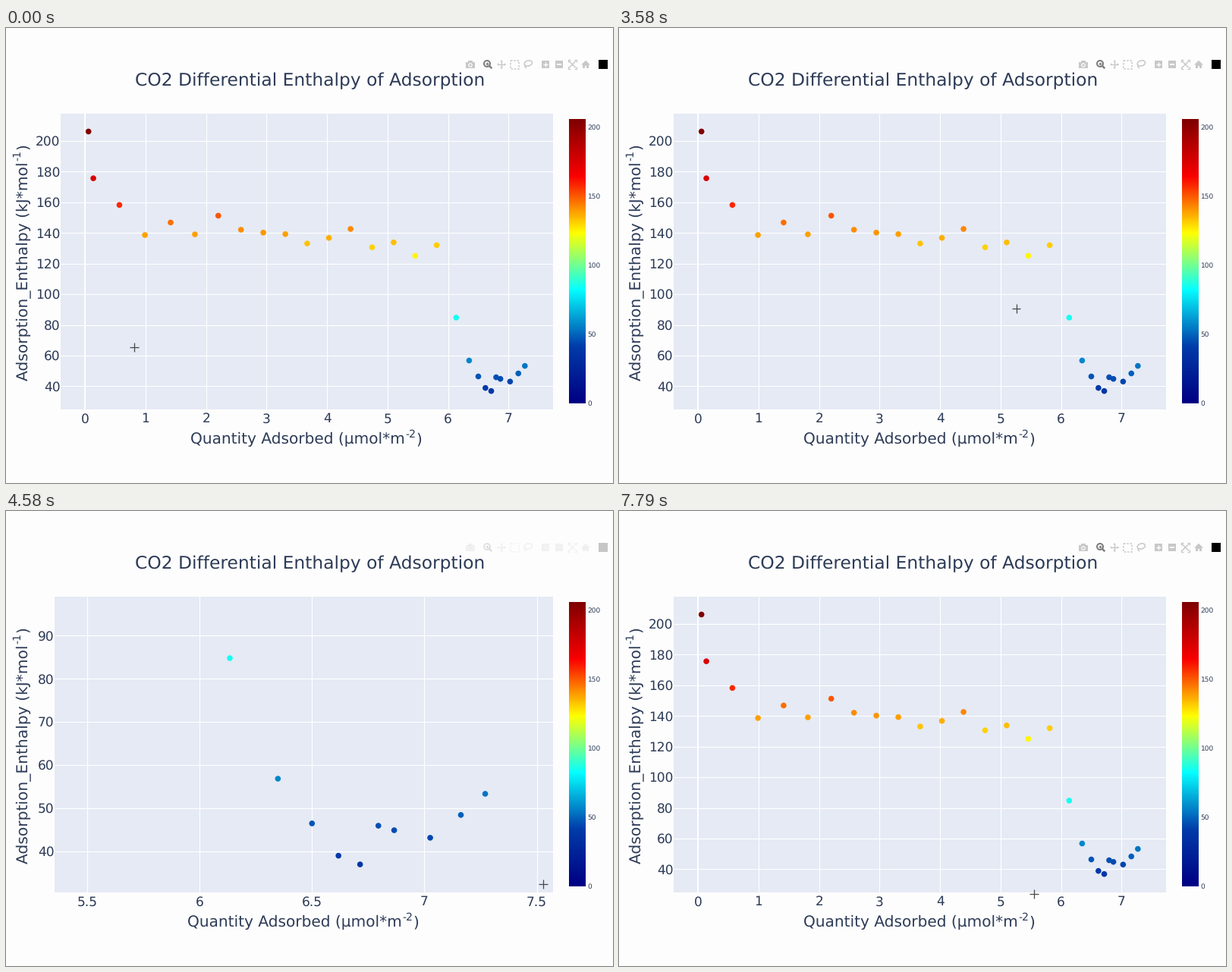
These frames come from a looping animation (800x600 px, 7850 ms). A matplotlib script:

```python
import numpy as np
import matplotlib.pyplot as plt
from matplotlib.animation import FuncAnimation
from matplotlib.colors import LinearSegmentedColormap
from matplotlib.patches import Rectangle, Circle, Ellipse, Polygon

plt.rcParams["font.family"] = "DejaVu Sans"
plt.rcParams["text.hinting"] = "none"
plt.rcParams["toolbar"] = "None"

LOOP, STEP = 7850, 50
PT = 0.72                      # points per pixel at 100 dpi
INK, PAGE, PLOT = "#2d3b57", "#fdfdfd", "#e5eaf5"
TOP, BOTTOM, RIGHT = 112.5, 502.5, 721
CMAX = 206.2
PRESS, BOX_ON, ZOOM, RESET = 3700, 3790, 4500, 6900
DRAG = np.array([(531.1, 352.9), (707.9, 491.7)])
CMAP = LinearSegmentedColormap.from_list(
    "heat", ["#000083", "#003caa", "#05ffff", "#ffff00", "#fa0000", "#800000"])

# doses: three first ones, an even plateau, then ever closer steps
k = np.arange(14)
plateau = .989 + .355 * k + .21 * (1 - np.exp(-k / 2.5))
k = np.append(np.arange(7), 8.84 + 3.2 * np.arange(3))
tail = 6.13512 + .52708 * np.log(1 + k / 2)
QTY = np.concatenate([[.05512, .13528, .56631], plateau, tail])
HEAT = np.array([
    206.1834, 175.6712, 158.2731, 138.6725, 146.8318, 139.1046, 151.2874,
    142.127, 140.2519, 139.2637, 133.1342, 136.8025, 142.6341, 130.6583,
    133.8716, 125.1038, 132.0462, 84.80637, 56.81425, 46.43218, 38.94254,
    36.92371, 45.90183, 44.85126, 43.10457, 48.40319, 53.30842])

# pointer moves: start, end, x, y; it rests in between
HOME = (169, 421)
MOVES = [
    (30, 730, 308, 272), (1030, 1700, 110, 143), (1850, 2250, 147, 241),
    (2640, 3400, 511, 399), (3450, 3650, *DRAG[0]), (PRESS, 3925, 598, 419),
    (3925, 4350, *DRAG[1]), (4720, 5400, 404, 414), (5580, 5690, 439, 452),
    (5740, 6000, 466, 470), (6360, 6700, 456, 416), (7180, 7740, 547, 505)]

fig = plt.figure(figsize=(8, 6), dpi=100, facecolor=PAGE)
ax = fig.add_axes([0, 0, 1, 1])
ax.axis("off")


def text(x, y, s, size, color=INK, **kw):
    return ax.text(x, y, s, fontsize=size * PT, color=color, **kw)


def line(xs, ys, color, width, z=2, **kw):
    return ax.plot(xs, ys, color=color, lw=width * PT, zorder=z,
                   solid_capstyle="butt", **kw)[0]


def add(patch, z=2):
    patch.set_zorder(z)
    return ax.add_patch(patch)


class View:
    """One state of the chart: its axes, grid, points and labels."""

    def __init__(self, left, low, high, xstep, ystep):
        self.left, self.low, self.high = left, np.array(low), np.array(high)
        self.corner = np.array([left, BOTTOM])
        self.span = np.array([RIGHT - left, TOP - BOTTOM])
        self.parts = [add(Rectangle((left, TOP), RIGHT - left, BOTTOM - TOP,
                                    fc=PLOT, lw=0), 1)]
        ticks = [np.arange(np.ceil(a / s) * s, b, s)
                 for a, b, s in zip(low, high, (xstep, ystep))]
        for v in ticks[0]:
            x = self.pixel([v, 0])[0]
            self.parts += [
                line([x, x], [TOP, BOTTOM], "white", 2 if v == 0 else 1.1),
                text(x, 520.3, f"{abs(v):g}", 17, ha="center")]
        for v in ticks[1]:
            y = self.pixel([0, v])[1]
            self.parts += [line([left, RIGHT], [y, y], "white", 1.1),
                           text(left, y + 6, f"{v:g}", 17, ha="right")]
        data = np.column_stack([QTY, HEAT])
        self.data = data[(data > low).all(1) & (data < high).all(1)]
        self.px = self.pixel(self.data)
        self.colors = CMAP(self.data[:, 1] / CMAX)
        self.parts.append(ax.scatter(*self.px.T, s=(7.6 * PT) ** 2,
                                     c=self.colors, lw=0, zorder=3))
        mid = (left + RIGHT) / 2
        self.parts += [text(mid - 153, 548, "Quantity Adsorbed (µmol*m", 20.2),
                       text(mid + 130, 539.5, "-2", 14),
                       text(mid + 144.5, 548, ")", 20.2)]

    def pixel(self, value):
        return self.corner + (value - self.low) / (self.high - self.low) * self.span

    def value(self, pixel):
        return self.low + (pixel - self.corner) / self.span * (self.high - self.low)

    def show(self, on):
        for p in self.parts:
            p.set_visible(on)

    def hovered(self, pos):
        d = np.hypot(*(self.px - pos).T)
        return int(d.argmin()) if d.min() < 20 else None


full = View(71.5, (-.4115, 25.16), (7.7365, 218.05), 1, 20)
(x0, y1), (x1, y0) = full.value(DRAG)
near = View(63.5, (x0, y0), (x1, y1), .5, 10)     # shows the dragged box

# titles
text(170, 76.3, "CO2 Differential Enthalpy of Adsorption", 23.42)
up = dict(rotation=90, rotation_mode="anchor")
text(28, 465, "Adsorption_Enthalpy (kJ*mol", 20.3, **up)
text(19.5, 175, "-1", 14, **up)
text(28, 160, ")", 20.3, **up)

# colour bar
ax.imshow(np.linspace(1, 0, 375)[:, None], cmap=CMAP, aspect="auto",
          extent=(741.5, 763.5, 495, 120), zorder=2)
for v in range(0, 201, 50):
    text(766, 498.3 - v * 1.82, str(v), 9)

ax.set_xlim(0, 800)
ax.set_ylim(600, 0)


def toolbar(y=48, g="#c8c8c8", dark="#7c7c7c", w="white"):
    def box(x, dx, dy, c=g, oy=0):
        return add(Rectangle((x - dx / 2, y + oy - dy / 2), dx, dy, fc=c, lw=0))

    def plus(x, r, c, yc=y):
        return [line([x - r, x + r], [yc, yc], c, 1.4),
                line([x, x], [yc - r, yc + r], c, 1.4)]

    # camera, magnifier
    parts = [box(612, 12, 8, oy=1), box(612, 6, 3, oy=-4)]
    parts += [add(Circle((612, y + 1), r, fc=c, lw=0)) for r, c in ((2.8, w), (1.6, g))]
    parts += [add(Circle((634, y - 1), 4, fc=w, ec=dark, lw=1.4)),
              line([637, 640.3], [y + 2, y + 5.3], dark, 2.4)]
    parts += plus(634, 2, dark, y - 1)
    # pan, with an arrowhead on each arm
    parts += plus(653, 5, g)
    for a in range(4):
        turn = np.array([a * 90 - 25, a * 90, a * 90 + 25]) * np.pi / 180
        r = np.array([4, 6, 4])
        parts.append(add(Polygon(np.column_stack([653 + r * np.cos(turn),
                                                  y + r * np.sin(turn)]), fc=g, lw=0)))
    # box and lasso selection
    parts += [add(Rectangle((665, y - 5), 10.5, 10.5, fill=False, ec=g, lw=1.1,
                            ls=(0, (1.6, 1.2)))),
              add(Ellipse((688.3, y - 1.5), 10.5, 7, angle=-15, fill=False, ec=g, lw=1.1)),
              line([684.5, 683.8, 686], [y + 1, y + 3, y + 5], g, 1.4)]
    # zoom in and out
    parts += [box(711.2, 10.5, 10.5), *plus(711.2, 2.8, w),
              box(728.8, 10.5, 10.5), box(728.8, 5.6, 1.5, w)]
    # autoscale
    for sx in (-1, 1):
        parts.append(line([742, 751], [y - 4.5 * sx, y + 4.5 * sx], g, 1.4))
        for sy in (-1, 1):
            cx, cy = 746.5 + 5.7 * sx, y + 5.7 * sy
            parts.append(line([cx - 3 * sx, cx, cx], [cy, cy, cy - 3 * sy], g, 1.3))
    # home, then the plain dark square
    parts += [add(Polygon([(758, y + .5), (764, y - 5.2), (770, y + .5)], fc=g, lw=0)),
              box(764, 8, 5.2, oy=2.6), box(764, 2.2, 3.2, w, 3.6),
              box(787, 12, 12, "black")]
    return parts


bar = toolbar()

# zoom selection
blank = [(0, 0)] * 3
shade = add(Polygon(blank, fc="black", lw=0, antialiased=False), 5)
corners = [add(Polygon(blank, fc="white", ec="#555555", lw=.6), 6) for _ in range(4)]

# hover label and pointer
tip_arrow = add(Polygon(blank, lw=0), 7)
tip = text(0, 0, "", 9.85, "white", family="Liberation Sans", va="center", zorder=8,
           bbox=dict(boxstyle="square,pad=0.24", ec="white", lw=.4))
cross = [line([0, 0], [0, 0], "#4a4a4a", 1.3, 9) for _ in range(2)]


def pointer(t):
    pos = np.array(HOME, float)
    for start, end, x, y in MOVES:
        pos += (np.array([x, y]) - pos) * np.clip((t - start) / (end - start), 0, 1)
    return pos


def ease(t, start, length):
    return 1 - (1 - np.clip((t - start) / length, 0, 1)) ** 2


def draw_selection(t):
    on = BOX_ON <= t < ZOOM
    for p in [shade] + corners:
        p.set_visible(on)
    if not on:
        return
    (x0, y0), (x1, y1) = DRAG[0], pointer(t - 54)
    l = full.left
    shade.set_xy([(l, TOP), (RIGHT, TOP), (RIGHT, BOTTOM), (l, BOTTOM), (l, TOP),
                  (x0, y0), (x0, y1), (x1, y1), (x1, y0), (x0, y0), (l, TOP)])
    shade.set_alpha(.3 * ease(t, BOX_ON, 220))
    arm = min(8, (x1 - x0) / 2, (y1 - y0) / 2)
    ell = np.array([(0, arm), (0, 0), (arm, 0), (arm, -2.5), (-2.5, -2.5), (-2.5, arm)])
    spots = [(x, y, sx, sy) for x, sx in ((x0, 1), (x1, -1))
             for y, sy in ((y0, 1), (y1, -1))]
    for p, (x, y, sx, sy) in zip(corners, spots):
        p.set_xy(ell * (sx, sy) + (x, y))


def draw_tip(view, t, pos):
    i = None if PRESS <= t < ZOOM else view.hovered(pos)
    tip.set_visible(i is not None)
    tip_arrow.set_visible(i is not None)
    if i is None:
        return
    px, py = view.px[i]
    qty, heat = view.data[i]
    tip.set_text(f"({qty:.5f}, {heat:.7g})")
    tip.set_position((px + 10.6, py + .3))
    tip.get_bbox_patch().set_facecolor(view.colors[i])
    tip_arrow.set_xy([(px + 4.5, py), (px + 9, py - 3.5), (px + 9, py + 3.5)])
    tip_arrow.set_facecolor(view.colors[i])


def update(i):
    t = i * STEP + STEP / 2
    zoomed = ZOOM <= t < RESET
    full.show(not zoomed)
    near.show(zoomed)
    x, y = pos = pointer(t)
    cross[0].set_data([x - 5.8, x + 5.8], [y, y])
    cross[1].set_data([x, x], [y - 5.8, y + 5.8])
    fade = 1 - ease(t, 3800, 350) + ease(t, ZOOM + 35, 350)
    for p in bar:
        p.set_alpha(fade)
    draw_selection(t)
    draw_tip(near if zoomed else full, t, pos)
    return []


update(0)
anim = FuncAnimation(fig, update, frames=LOOP // STEP, interval=STEP,
                     repeat=True, repeat_delay=0, blit=False)
plt.show()
```
